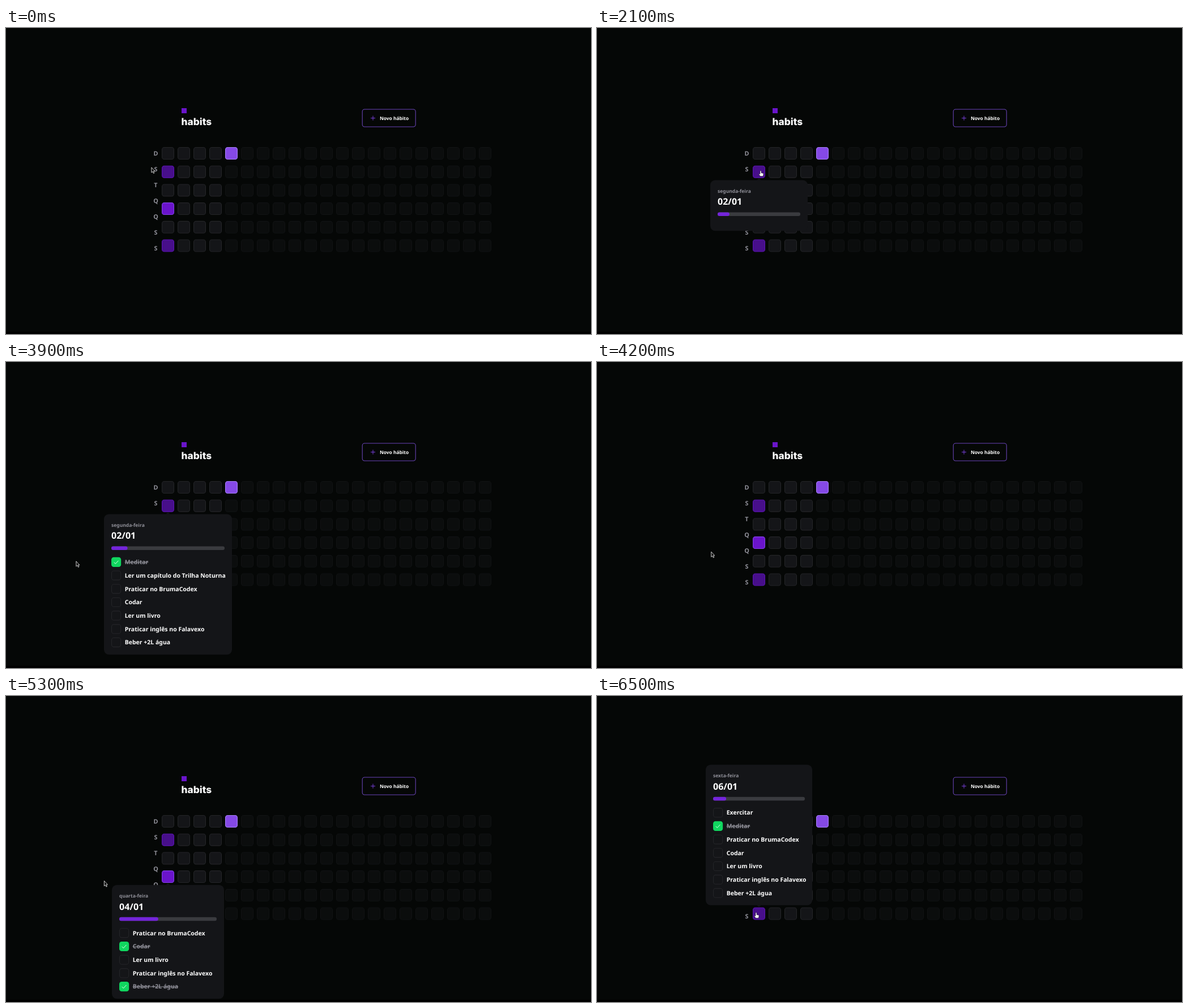
Write an HTML page that moves like this. It is 1033 px wide and 542 px high and loops after 8 s.

```html
<!DOCTYPE html>
<html lang="pt-BR">
<head>
<meta charset="utf-8">
<title>habits</title>
<style>
  html, body { margin: 0; width: 100%; height: 100%; overflow: hidden; background: #050706; }
  svg { display: block; width: 100vw; height: 100vh; }
  text { font-family: "Noto Sans", "Open Sans", sans-serif; font-weight: 600; fill: #fff; text-rendering: geometricPrecision; }
  .muted { fill: #8f8f98; }
  .label { font-size: 10.8px; font-weight: 700; text-anchor: middle; }
  .day { font-size: 8.5px; }
  .date { font-size: 16px; font-weight: 700; }
  .item { font-size: 10.5px; }
  .done { text-decoration: line-through; }
  .brand { font: 800 17.3px Inter, sans-serif; }
  .button { font-size: 8.4px; }
</style>
</head>
<body>
<svg id="stage" viewBox="0 0 1033 542" xmlns="http://www.w3.org/2000/svg"></svg>
<script>
const LOOP = 8000, STEP = 100;
const CELL = 22, LEFT = 275, TOP = 211, COL = 28, ROW = 32.7, CENTER = LEFT + CELL / 2;
const PAD = 13, LINE = 23.7, CHECK = 17.2;
const SURFACE = '#141518', BORDER = '#242528';
const stage = document.getElementById('stage');

const rowY = row => TOP + row * ROW;
const text = (cls, x, y, s) => `<text class="${cls}" x="${x}" y="${y}">${s}</text>`;
const box = (x, y, w, h, r, fill, stroke = 'none') =>
  `<rect x="${x}" y="${y}" width="${w}" height="${h}" rx="${r}" fill="${fill}" stroke="${stroke}" stroke-width="1.08"/>`;
// A square whose border lies inside its edges
const tile = (x, y, size, fill, stroke) => box(x + .54, y + .54, size - 1.08, size - 1.08, 3.8, fill, stroke);

const daily = ['Praticar no BrumaCodex', 'Codar', 'Ler um livro', 'Praticar inglês no Falavexo', 'Beber +2L água'];
// x: where the pointer rests on the cell; exits: moves made while the card is open
const visits = [
  { row: 0, x: 283, open: 600, loading: 100, close: 1400, day: 'domingo', date: '01/01', width: 172, done: [], items: [],
    exits: [{ from: 1100, to: 1200, x: 204.5, y: 226.5 }, { from: 1200, to: 1300, x: 175, y: 207 }] },
  { row: 1, x: 289, open: 2100, loading: 100, close: 4000, day: 'segunda-feira', date: '02/01', width: 226,
    done: ['Meditar'], items: ['Meditar', 'Ler um capítulo do Trilha Noturna', ...daily],
    exits: [{ from: 2100, to: 3000, x: 195, y: 376 }, { from: 3700, to: 3900, x: 123.5, y: 352.5 }] },
  { row: 3, x: 283, open: 4700, loading: 200, close: 5400, day: 'quarta-feira', date: '04/01', width: 198,
    done: ['Codar', 'Beber +2L água'], items: daily,
    exits: [{ from: 4900, to: 5000, x: 228, y: 350 }, { from: 5100, to: 5300, x: 173, y: 327 }] },
  { row: 5, x: 281, open: 6400, loading: 100, close: LOOP, day: 'sexta-feira', date: '06/01', width: 188, above: true,
    done: ['Meditar'], items: ['Exercitar', 'Meditar', ...daily], exits: [] },
];

function cellColors(col, row) {
  if (col === 4 && row === 0) return ['#8549e6', '#a680f6'];
  const visit = col === 0 && visits.find(v => v.row === row);
  if (visit && visit.done.length) return visit.done.length > 1 ? ['#6a14cb', '#8440ea'] : ['#470f8a', '#5c15b4'];
  return col < 4 ? [SURFACE, BORDER] : ['#0b0d0d', '#111314'];
}

function page() {
  let out = box(0, 538, 1033, 4, 0, '#000');
  out += box(310, 142, 9, 9, 0, '#6a14cb') + text('brand', 309.6, 172.4, 'habits');
  out += box(629.2, 144, 94, 31, 4, 'none', '#6a45b8');
  out += '<path d="M648 155.6v8M644 159.6h8" stroke="#7a40dd"/>';
  out += text('button', 660, 162.7, 'Novo hábito');
  [...'DSTQQSS'].forEach((letter, i) => out += text('label muted', 264.5, 226 + COL * i, letter));
  for (let col = 0; col < 21; col++)
    for (let row = 0; row < 6; row++)
      out += tile(LEFT + col * COL, rowY(row), CELL, ...cellColors(col, row));
  return out;
}

function habit(name, done, x, y) {
  const top = y - CHECK / 2;
  const mark = done
    ? box(x, top, CHECK, CHECK, 4.3, '#10d65f') +
      `<path d="M${x + 4.6} ${y + .3}l2.7 2.7 5.2-5.6" fill="none" stroke="#d9ffe8"/>`
    : tile(x, top, CHECK, SURFACE, BORDER);
  return mark + text(done ? 'item muted done' : 'item', x + LINE, y + 3.7, name);
}

function card(visit, loaded) {
  const { row, items, done } = visit;
  const full = loaded && items.length > 0, above = full && visit.above;
  const width = full ? visit.width : 172;
  const height = full ? 82.9 + LINE * items.length : 89.8;
  const x = CENTER - width / 2;
  const y = above ? rowY(row) - 4 - height : rowY(row) + CELL + 3.7;
  const inner = x + PAD, barWidth = width - 2 * PAD;
  let out = box(x, y, width, height, 8.6, SURFACE);
  out += `<path d="M${CENTER - 4} ${above ? y + height : y}h8l-4 ${above ? 3 : -3}z" fill="${SURFACE}"/>`;
  out += text('day muted', inner, y + 22.6, visit.day) + text('date', inner, y + 44, visit.date);
  out += box(inner, y + 57, barWidth, 6.5, 3.2, '#3a3b3f');
  if (done.length) out += box(inner, y + 57, barWidth * done.length / items.length, 6.5, 3.2, '#7425da');
  if (full) items.forEach((name, i) => out += habit(name, done.includes(name), inner, y + 85 + LINE * i));
  return out;
}

// The pointer heads for a cell once the card before it has closed, and arrives as it is pressed.
const moves = visits.flatMap((visit, i) => [
  { from: i ? visits[i - 1].close + STEP : 0, to: visit.open - STEP, x: visit.x, y: rowY(visit.row) + 9 },
  ...visit.exits,
]);
const easeOut = k => 1 - (1 - k) ** 3;

function pointer(t) {
  let x = 256.5, y = 246.5;
  for (const move of moves) {
    const k = easeOut(Math.min(1, Math.max(0, (t - move.from) / (move.to - move.from))));
    x += (move.x - x) * k;
    y += (move.y - y) * k;
  }
  const overCell = Math.abs(x - CENTER) < CELL / 2 && (y - TOP) % ROW < CELL;
  const shape = overCell
    ? '<path d="M-1 1a1 1 0 0 1 2 0V4L4 4.6Q5 5 5 6L4.2 9.8H-.6L-3 6.6Q-3 5.2-2 5.6L-1 6.4Z" fill="#fff" stroke="#111" stroke-width=".5"/>'
    : '<path d="M.4.4V9.6L2.5 7.7 4 11 5.4 10.3 4 7.1H6.4Z" fill="#0b0b0b" stroke="#ddd" stroke-width=".9"/>';
  return `<g transform="translate(${x} ${y})">${shape}</g>`;
}

function overlay(t) {
  let out = '';
  for (const visit of visits) {
    const { row, open, loading, close } = visit;
    if (t >= open - STEP && t < open)
      out += box(LEFT - 1.5, rowY(row) - 1.5, CELL + 3, CELL + 3, 5.5, 'none', '#7444d0');
    if (t >= open && t < close) out += card(visit, t >= open + loading);
  }
  return out + pointer(t);
}

stage.innerHTML = page() + '<g id="overlay"></g>';
const layer = document.getElementById('overlay');
let shown = -1;
function frame() {
  const t = Math.floor(performance.now() % LOOP / STEP) * STEP;
  if (t !== shown) layer.innerHTML = overlay(shown = t);
  requestAnimationFrame(frame);
}
frame();
</script>
</body>
</html>
```
